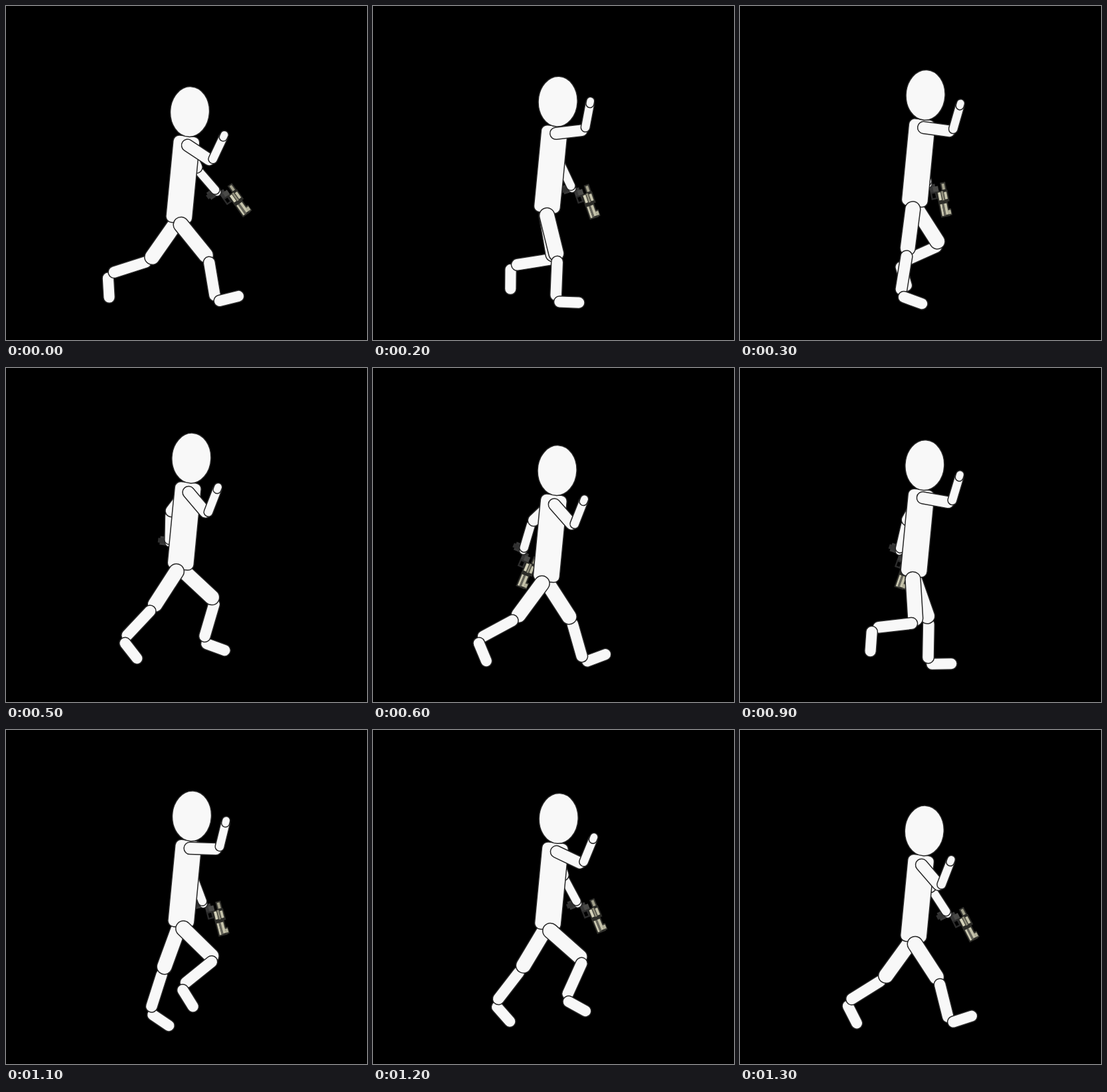
An HTML page for the animation above (1.4 s loop, 544 px wide and 504 px high).

```html
<!DOCTYPE html>
<html lang="en">
<head>
<meta charset="utf-8">
<title>Running figure</title>
<style>
  html, body { margin: 0; width: 100%; height: 100%; overflow: hidden; background: #000; }
  svg { display: block; width: 100%; height: 100%; }
  .body { fill: #f8f8f8; stroke: #262626; stroke-width: 1.5; }
</style>
</head>
<body>
<svg id="stage" viewBox="0 0 544 504"></svg>
<script>
const NS = 'http://www.w3.org/2000/svg';
const stage = document.getElementById('stage');
const STEP = 100, CYCLE = 14, STRIDE = CYCLE / 2;

// A smooth periodic curve through a few key points.
function curve(period, times, values) {
  const n = times.length;
  const t = i => times[(i + n) % n] + period * Math.floor(i / n);
  const v = i => values[(i + n) % n];
  const slope = i => (v(i + 1) - v(i - 1)) / (t(i + 1) - t(i - 1));
  return phase => {
    const p = phase % period;
    let i = n - 1;
    while (times[i] > p) i--;
    const span = t(i + 1) - t(i), s = (p - t(i)) / span, r = 1 - s;
    return v(i) * r * r * (1 + 2 * s) + v(i + 1) * s * s * (3 - 2 * s)
      + span * s * r * (slope(i) * r - slope(i + 1) * s);
  };
}

// Angles are degrees from straight down, positive towards the right.
// Both legs share one gait, half a cycle apart.
const gaitKeys = [0, 0.75, 1.75, 3.75, 5.75, 7.75, 8.75, 10.75, 12, 12.75];
const gait = values => curve(CYCLE, gaitKeys, values);
const thighAngle = gait([39, 45.4, 19.3, -20, -36, -28.3, 3.5, 45.5, 47, 33]);
const shinAngle = gait([9.5, -2.3, -1, -17.7, -58, -78.5, -83.5, -51, -16.3, 14]);
const footAngle = gait([104, 90, 91, 56, 27, -8, -4, 32, 70, 108]);

const swingKeys = [0, 2, 5, 7.75, 8.75, 10.75, 12.75];
const swing = values => curve(CYCLE, swingKeys, values);
const nearArm = swing([56.4, 96.6, 40.3, 60, 80, 88.2, 40.7]);
const farArm = swing([25.5, 12.5, -37, -52.6, -29.5, 11.5, 24]);
const farFore = swing([41, 25, -1, -40, -13, 20.5, 33]);

const headY = curve(STRIDE, [0, 0.75, 1.75, 3.75, 5, 5.75], [159.5, 160, 146.7, 129.8, 136, 152]);

function add(tag, attrs, parent = stage) {
  const el = document.createElementNS(NS, tag);
  for (const key in attrs) el.setAttribute(key, attrs[key]);
  return parent.appendChild(el);
}

// A rounded limb hanging from its joint, with cap centres at "from" and "to".
function limb(from, to, r) {
  return add('rect', {
    class: 'body', x: -r, y: from - r, width: 2 * r, height: to - from + 2 * r, rx: r
  });
}

function place(el, p, angle) {
  el.setAttribute('transform', `translate(${p.x} ${p.y}) rotate(${-angle})`);
}

function along(p, angle, length) {
  const a = angle * Math.PI / 180;
  return { x: p.x + Math.sin(a) * length, y: p.y + Math.cos(a) * length };
}

const limbs = {
  thigh: () => limb(8, 67, 11.6),
  shin: () => limb(6, 56, 9),
  foot: () => limb(6, 35, 8.8),
  upper: () => limb(4, 43, 9.1),
  farUpper: () => limb(4, 39, 9.1),
  fore: () => limb(4, 40, 6.9),
  hand: () => limb(40.5, 44.5, 6.1)
};

function build(...names) {
  return Object.fromEntries(names.map(name => [name, limbs[name]()]));
}

// Drawn with the hand at the origin and the barrel pointing down.
function buildGun() {
  const g = add('g', {});
  const box = (x, y, width, height, fill) => add('rect', { x, y, width, height, fill }, g);
  // grip and frame
  box(-14, -9, 8, 13, '#383838');
  box(-17, -6, 11, 7, '#303030');
  box(-7, -4, 9, 8, '#414141');
  box(1, 1, 9, 13, '#383838');
  box(6, 5, 8, 9, '#4a4a48');
  add('rect', { x: 2, y: 14, width: 7, height: 9, fill: 'none', stroke: '#2b2b2b', 'stroke-width': 2.4 }, g);
  // dark silhouette
  box(10, 13, 17, 18, '#2d2d29');
  box(18, 1, 8, 12, '#33332f');
  box(10, 30, 14, 23, '#2d2d29');
  box(22, 42, 5, 10, '#3c3c36');
  // highlights
  box(20, 3, 4, 9, '#a3a18c');
  box(12, 15, 4, 12, '#d3d1b9');
  box(17, 14, 3, 14, '#8f8d7a');
  box(21, 16, 4, 11, '#c4c2aa');
  box(12, 33, 3, 18, '#c9c7b0');
  box(15, 33, 3, 18, '#65645a');
  box(18, 33, 4, 17, '#c4c2aa');
  box(22, 44, 4, 6, '#b4b29b');
  return g;
}

// Created from back to front.
const gun = buildGun();
const back = build('hand', 'fore', 'farUpper', 'foot', 'shin', 'thigh');
const torso = add('rect', { class: 'body', x: -20, y: -66, width: 40, height: 132, rx: 9 });
const head = add('ellipse', { class: 'body', rx: 29.5, ry: 37.9 });
const front = build('thigh', 'shin', 'foot', 'upper', 'fore', 'hand');

function poseLeg(parts, hip, phase) {
  const thigh = thighAngle(phase), shin = shinAngle(phase);
  const knee = along(hip, thigh, 74);
  const ankle = along(knee, shin, 66);
  place(parts.thigh, hip, thigh);
  place(parts.shin, knee, shin);
  place(parts.foot, ankle, footAngle(phase));
}

function poseArm(upper, parts, shoulder, angle, length, bend) {
  const elbow = along(shoulder, angle, length);
  place(upper, shoulder, angle);
  place(parts.fore, elbow, bend);
  place(parts.hand, elbow, bend);
  return elbow;
}

function draw(time) {
  const step = Math.floor(time / STEP) % CYCLE;
  // The second stride runs a quarter step late.
  const phase = step < STRIDE ? step : step - 0.25;
  const y = headY(phase < STRIDE ? phase : phase - STRIDE);
  const x = 277 + (160 - y) * 0.1;
  const hip = { x: x - 18.3, y: y + 164.3 };
  const shoulder = { x: x - 6.8, y: y + 48.5 };

  place(head, { x, y }, -3);
  place(torso, { x: x - 10.7, y: y + 102.3 }, -5.5);
  poseLeg(back, hip, phase + STRIDE);
  poseLeg(front, hip, phase);

  const near = nearArm(phase), fore = farFore(phase);
  poseArm(front.upper, front, shoulder, near, 48, 154 + 0.36 * Math.abs(near - 54));
  const elbow = poseArm(back.farUpper, back, shoulder, farArm(phase), 43.5, fore);
  place(gun, along(elbow, fore, 45), fore - 6);
}

const start = performance.now();
function tick() {
  draw(performance.now() - start);
  requestAnimationFrame(tick);
}
tick();
</script>
</body>
</html>
```
